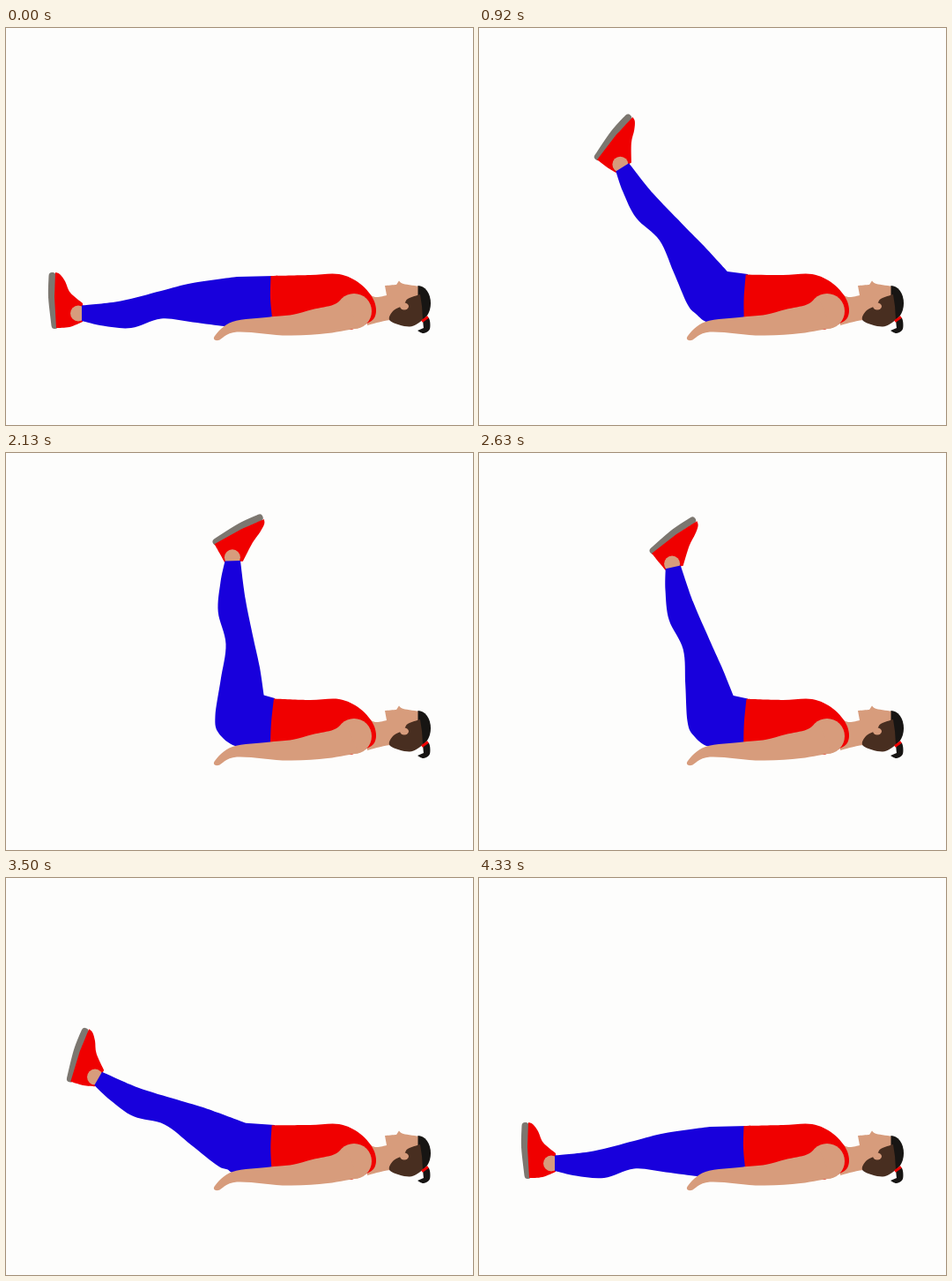
Animation of 530 by 450 pixels, one loop 4370 ms. Source, as an HTML page with a canvas:

```html
<!DOCTYPE html>
<html lang="en">
<head>
<meta charset="utf-8">
<title>Leg raise</title>
<style>
html, body { margin: 0; width: 100%; height: 100%; overflow: hidden; background: #fdfdfc; }
canvas { display: block; }
</style>
</head>
<body>
<canvas id="stage" width="530" height="450"></canvas>
<script>
const ctx = document.getElementById('stage').getContext('2d');
const LOOP = 4370, STEP = 1000 / 24, TAU = Math.PI * 2;
const PAPER = '#fdfdfc', SKIN = '#d79c7c', RED = '#f00000', BLUE = '#1800dc';
const BROWN = '#482e20', BLACK = '#171513', SOLE = '#7c7770';
const HIP = [274, 310], ANKLE = [70, 320];

const clamp = v => Math.min(1, Math.max(0, v));

// Sine ease with a slightly slow start
function ease(t, start, end, lag) {
  const s = clamp((t - start) / (end - start));
  return (1 - Math.cos(Math.PI * Math.pow(s, lag))) / 2;
}

// 0 = legs on the floor, 1 = legs upright
const raise = t => ease(t, 0, 1510, 1.05) - ease(t, 1850, 4340, 1.21);

function turn([x, y], [cx, cy], deg) {
  const r = deg * Math.PI / 180, c = Math.cos(r), s = Math.sin(r);
  return [cx + (x - cx) * c - (y - cy) * s, cy + (x - cx) * s + (y - cy) * c];
}

// Smooth curve through the points, continuing the current path
function curve(pts) {
  ctx.lineTo(...pts[0]);
  for (let i = 0; i < pts.length - 1; i++) {
    const a = pts[i - 1] || pts[i], b = pts[i], c = pts[i + 1], d = pts[i + 2] || c;
    ctx.bezierCurveTo(b[0] + (c[0] - a[0]) / 6, b[1] + (c[1] - a[1]) / 6,
      c[0] - (d[0] - b[0]) / 6, c[1] - (d[1] - b[1]) / 6, c[0], c[1]);
  }
}

// Closed shape: each run is smooth, corners fall between runs
function shape(color, ...runs) {
  ctx.beginPath();
  runs.forEach(curve);
  ctx.closePath();
  ctx.fillStyle = color;
  ctx.fill();
}

function line(color, width, pts, cap = 'round') {
  ctx.beginPath();
  curve(pts);
  ctx.strokeStyle = color;
  ctx.lineWidth = width;
  ctx.lineCap = cap;
  ctx.stroke();
}

function oval(color, x, y, rx, ry, from = 0, to = TAU) {
  ctx.beginPath();
  ctx.ellipse(x, y, rx, ry, 0, from, to);
  ctx.fillStyle = color;
  ctx.fill();
}

function drawLeg(u) {
  const swing = p => turn(p, HIP, 90 * u);

  // the toes point as the leg rises; the collar stays with the ankle
  const point = 25 * Math.pow(u, 0.85);
  const flex = p => swing(turn(p, ANKLE, -point * clamp((88 - p[0]) / 18)));
  line(SOLE, 8, [[52.5, 281], [52, 305], [55.5, 337]].map(flex));
  shape(RED,
    [[56, 277], [61, 279], [67, 287], [73, 300], [87, 312]].map(flex),
    [[87, 333], [72, 339], [57, 340]].map(flex),
    [[55, 305], [56, 277]].map(flex));
  oval(SKIN, ...swing([82, 323.5]), 9, 9);

  // the thigh shears a little as the knee gives
  const bend = ([x, y]) => {
    const k = u * Math.max(0, x - 130) / 14;
    return swing([x + (y - 305) * 0.05 * k, y + k]);
  };
  shape(BLUE,
    [...[[86, 314.5], [130, 309.5], [176, 298], [212, 289]].map(bend),
      [262 + 31 * u, 282 - 7.5 * Math.sqrt(u)]],
    [[305, 281 - 3 * u], [305, 327]],
    [[285, 331], [260, 336 - 4 * u], [256 - 15 * u, 337 - 20 * u],
      ...[[248, 338], [212, 333.5], [176, 329.5], [142, 340], [110, 337.5], [86, 332]].map(bend)]);
}

function drawHead() {
  shape(SKIN,
    [[408, 299], [419, 305], [432, 303]],
    [[430, 292], [443, 291]],
    [[446, 286.5], [451, 290], [470, 293]],
    [[470, 330], [436, 331], [410, 337]]);
  oval(BLACK, 467.5, 312, 14.5, 20, -TAU / 4, TAU / 4);
  shape(BROWN,
    [[470, 302], [456, 307], [451, 314], [439, 321], [436, 332], [458, 338.5], [473, 331]],
    [[472, 315], [470, 302]]);
  oval(SKIN, 452, 315.5, 5, 4);
  shape(BLACK, [[473, 331], [480, 329], [481, 341], [474, 346], [467, 343]], [[474, 340], [473, 331]]);
  line(RED, 3, [[472, 332.5], [479, 327.5]], 'butt');
}

function drawTorso(u) {
  const top = [300.5 + 3.5 * u, 281 - 2.5 * u], base = [302 - 2 * u, 328];
  shape(RED,
    [top, [345, 280], [378, 279], [402, 290], [418, 310], [417, 330], [392, 342]],
    [[340, 337]],
    [base, [300 + u, 306], top]);
  oval(SKIN, 395, 321, 20, 20);
  shape(SKIN, [
    [385, 304], [372, 313.5], [348, 319], [325, 325], [300, 327.5], [257, 333],
    [237, 349], [241, 354], [262, 344.5], [320, 348.5], [365, 346], [400, 340]
  ]);
}

function frame(now) {
  const t = Math.floor((now % LOOP + 5) / STEP) * STEP;
  const u = raise(t);
  ctx.fillStyle = PAPER;
  ctx.fillRect(0, 0, 530, 450);
  drawLeg(u);
  drawHead();
  drawTorso(u);
  requestAnimationFrame(frame);
}
requestAnimationFrame(frame);
</script>
</body>
</html>
```
